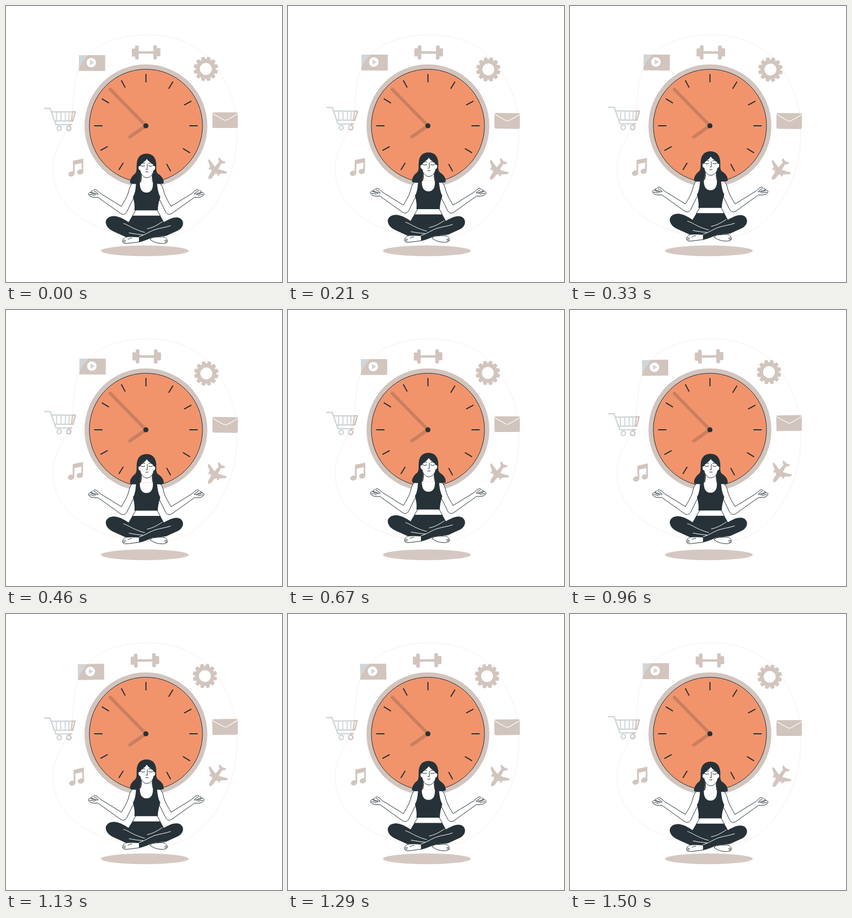
Recreate the animation shown at these times as an HTML page. Size 500 by 500 pixels, loop 1.54 s.

```html
<!DOCTYPE html>
<html lang="en">
<head>
<meta charset="utf-8">
<title>Calm hour</title>
<style>
  html, body { margin: 0; width: 100%; height: 100%; overflow: hidden; background: #fff; }
  svg { display: block; width: 100vw; height: 100vh; }
  .ink { fill: #263238; }
  .skin { fill: #fff; stroke: #263238; stroke-width: 1; stroke-linejoin: round; stroke-linecap: round; }
  .line { fill: none; stroke: #263238; stroke-width: 1; stroke-linecap: round; }
  .seam { fill: none; stroke: #fff; stroke-width: 1; stroke-linecap: round; }
</style>
</head>
<body>
<svg viewBox="0 0 500 500">
  <defs>
    <path id="blob" d="M258 52C330 53 376 88 400 143C414 172 418 200 418 235C418 300 390 355 350 392C325 413 300 420 265 420C215 420 160 404 128 378C98 354 84 322 85 291C87 250 112 235 119 195C124 165 120 140 134 110C152 72 200 52 258 52Z"/>
    <clipPath id="warm"><use href="#blob"/><rect x="250" width="250" height="500"/></clipPath>

    <g id="icons">
      <!-- video -->
      <path d="M132 89H179.500V117.500H132Z"/>
      <circle cx="154.500" cy="102.500" r="8.600" fill="#fff"/>
      <path d="M152 97.800L160 102.500L152 107.200Z" fill="#d0d6d8"/>
      <!-- dumbbell -->
      <path d="M238 82H270V86.300H238Z"/>
      <rect x="228" y="77" width="7" height="14.500" rx="1.500"/>
      <rect x="234" y="71.700" width="6.300" height="25" rx="1.500"/>
      <rect x="267" y="71.500" width="6.300" height="25" rx="1.500"/>
      <rect x="272.500" y="76.500" width="7" height="14.500" rx="1.500"/>
      <!-- gear -->
      <g transform="translate(362 114)">
        <g id="teeth"></g>
        <circle r="14.300" fill="none" stroke="currentColor" stroke-width="6.800"/>
      </g>
      <!-- cart -->
      <g fill="none" stroke="currentColor" stroke-width="2.400" stroke-linejoin="round">
        <path d="M69 185.500H80L90.500 215H119.500"/>
        <path d="M82.500 191.800H125.500L121 208.300H88"/>
        <path d="M91.500 192V208M99.500 192V208M107.500 192V208M114.500 192L113.500 208M120.500 192L118.500 208" stroke-width="2"/>
        <circle cx="96.500" cy="221.500" r="4"/>
        <circle cx="113.500" cy="221.500" r="4"/>
      </g>
      <!-- envelope -->
      <rect x="374" y="192.700" width="46" height="28.300" rx="3"/>
      <path d="M375 195.500L394 206Q397.500 208 401 206L419.500 195.500" fill="none" stroke="#fff" stroke-width="1.200"/>
      <!-- plane -->
      <path transform="translate(380 295.500) rotate(215)" d="M0-22Q3.500-20 3.500-14V-8L8-4.500V-7H11V-2L20 4.500V8L3.500 2.500L2.500 14L7 18V21L0 19L-7 21V18L-2.500 14L-3.500 2.500L-20 8V4.500L-11-2V-7H-8V-4.500L-3.500-8V-14Q-3.500-20 0-22Z"/>
      <!-- notes -->
      <path d="M121.500 280.500L140 276.500V300H137.200V284.500L124.300 287.300V304H121.500Z"/>
      <ellipse cx="118.600" cy="304.300" rx="5.700" ry="4.500" transform="rotate(-15 118.600 304.300)"/>
      <ellipse cx="134.500" cy="300.700" rx="5.700" ry="4.500" transform="rotate(-15 134.500 300.700)"/>
    </g>

    <g id="arm">
      <path class="skin" d="M234 319C227 321 224 327 222 337C219 347 213 356 209 363L175 342C170 340 168 335.500 163 333C160 331.500 157.500 333 160 335.500C164 337 166 339 167 341C160 340 155 336 150.500 338.500C148 340 149.500 343 153 345C157 347 162 347 166.500 346.500L207 375.500C212 379 216.500 377.500 219 372.500L231 348Z"/>
      <path class="line" d="M151 341.500Q156 341 160 343.500M154.500 338.500Q159 341 163 342M157 334.500Q154 335 153.500 337.500"/>
    </g>
  </defs>

  <rect width="500" height="500" fill="#fff"/>
  <use href="#blob" fill="none" stroke="#f9e8e2" stroke-width=".8"/>

  <g fill="#d0d6d8" color="#d0d6d8"><use class="orbit" href="#icons"/></g>
  <g fill="#d2c5be" color="#d2c5be" clip-path="url(#warm)"><use class="orbit" href="#icons"/></g>

  <g transform="translate(253.500 217)">
    <circle r="111.300" fill="#d2c5be"/>
    <circle r="102.500" fill="#f1946c" stroke="#263238"/>
    <g stroke="#263238" stroke-width="2" stroke-linecap="round">
      <g id="quarters"></g>
      <g id="early"></g>
      <g id="late"></g>
    </g>
    <path d="M-64.500-66L0 0L-29 20" fill="none" stroke="#c97f60" stroke-width="6" stroke-linecap="round" stroke-linejoin="round"/>
    <circle r="4.600" class="ink"/>
  </g>

  <ellipse cx="251.500" cy="443.500" rx="79.500" ry="9.700" fill="#d5c8c2"/>

  <g id="person">
    <use href="#arm"/>
    <use href="#arm" transform="matrix(-1 0 0 1 508 0)"/>
    <!-- torso and top -->
    <path fill="#fff" d="M232 319H277L279 347L274 370L282 381H228L235 370L230 347Z"/>
    <path class="line" d="M235 370L229 380M274 370L279.500 380"/>
    <path class="ink" d="M235.500 318H242.500C242 330 245 338 254.500 338C264 338 267 330 266 318H273.500C274 331 276.500 340 279.500 346C277 354 275 362 275 370.200H232.500C234 362 232 354 230 346C233.500 340 235.500 331 235.500 318Z"/>

    <!-- hair -->
    <path class="ink" d="M254.500 267.500C244 267.500 238 274 237 284C236 292 238 299 234 303.500C228 308 223.500 315 225 321C231 323.500 239 322.500 243 319.500C245 313 245 307 244.500 302H265C264.500 307 265 313 267 319.500C271 322.500 280 323.500 285.500 321C287 314 281 307 275.500 304C270.500 300 273 292 272 284C271 274 265 267.500 254.500 267.500Z"/>
    <path fill="#fff" d="M245 300H265V319H245Z"/>
    <path class="line" d="M245 304C246 311 246 317 242.500 320M265 304C264.500 311 264.500 317 267 320"/>

    <!-- legs -->
    <path class="ink" d="M229 379.700L222 391.500C213 385.500 204 380.500 195 380.500C185 381 180 387 180.800 393C182 400 187 404.500 195 408.500L216 418L241 418.500V428C250 426 258 422 266 419L290 416.500L312 406.500C320 402 322 395 320 390C317 383 310 382 302 384C296 386 291 388.500 286 391.500L279.500 379.700Z"/>
    <path class="seam" d="M213 394C223 397 229 404 251 410M256 403.500C265 402 274 397 283 391M241 418C253 414 261 408 270 405C280 402 290 401 298 398M223 411C233 413 241 414 248 414.500"/>
    <path class="skin" d="M241 418.500C232 418 225 417.500 217 418.500C213 421 210 424.500 211.500 428C213 430.500 217 430.500 221 430L241 427.500Z"/>
    <path class="line" d="M213 424.500L217 425M212.500 427L216 427.500M221 423Q224 420 228 420.500"/>
    <path class="skin" d="M266 419.500C273 418.500 281 418 287 418.500C290.500 420.500 293 424 292 427.500C290 430.500 284 430.500 279 430C273 429.500 267 427.500 261 423Z"/>
    <path class="line" d="M291 424.500L287 425M291.500 427L288 427.500"/>

    <!-- face -->
    <path class="skin" d="M255 276C252 283 245 283 243 289.500C238.500 288.500 238.500 297 243 298C244 304 248.500 311 255 311C261.500 311 266.500 305 267.500 298C272 297 272 288.500 267.500 289.500C266 283 258 283 255 276Z"/>
    <path class="line" d="M244.500 289.500Q248 291.500 251.500 289.500M258.500 289.500Q262 291.500 265.500 289.500M245 285.500Q248 283.500 251.500 284.500M258.500 284.500Q262 283.500 265 285.500M256 286V296H253.500M253 300.500H257.500"/>
  </g>
</svg>
<script>
  const LOOP = 1540, LEAD = 50;
  const person = document.getElementById('person');
  const orbits = document.querySelectorAll('.orbit');

  // Repeats one path around the local centre, starting at an angle.
  function ring(id, count, first, d) {
    const group = document.getElementById(id);
    for (let i = 0; i < count; i++) {
      const part = document.createElementNS('http://www.w3.org/2000/svg', 'path');
      part.setAttribute('d', d);
      part.setAttribute('transform', `rotate(${first + i * 360 / count})`);
      group.append(part);
    }
  }
  const mark = 'M0-93V-79.500';
  ring('quarters', 4, 0, mark);
  ring('early', 4, 31.5, mark);
  ring('late', 4, 61.5, mark);
  ring('teeth', 12, 15, 'M-4-16L-2.800-22H2.800L4-16Z');

  function draw(ms) {
    const phase = (ms % LOOP + LEAD) / LOOP * 2 * Math.PI;
    const lift = 4.5 * (Math.cos(phase) - 0.98);
    const turn = 0.76 * (Math.sin(phase) - 0.2);
    person.setAttribute('transform', `translate(0 ${lift.toFixed(3)})`);
    for (const el of orbits) el.setAttribute('transform', `rotate(${turn.toFixed(4)} 253.5 217)`);
  }

  const start = performance.now();
  function tick() {
    draw(performance.now() - start);
    requestAnimationFrame(tick);
  }
  draw(0);
  requestAnimationFrame(tick);
</script>
</body>
</html>
```
